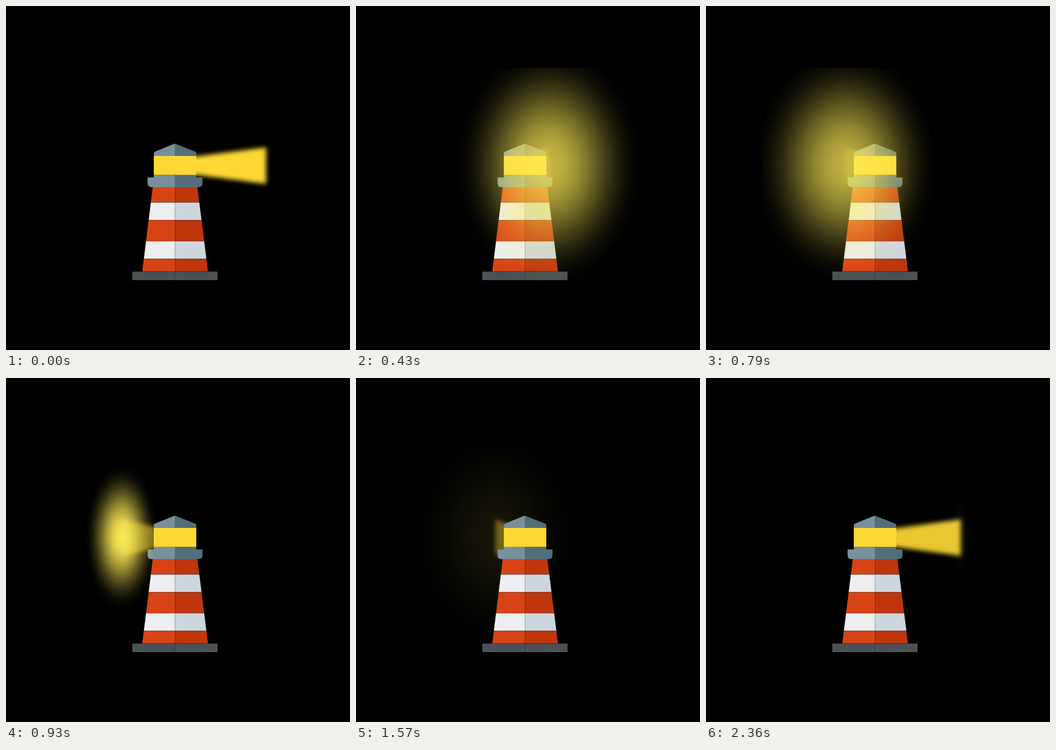
Recreate the animation shown at these times as an HTML page. Size 640x640 px, loop 2.43 s.

```html
<!DOCTYPE html>
<html lang="en">
<head>
<meta charset="utf-8">
<title>Lighthouse</title>
<style>
html, body { margin: 0; width: 100%; height: 100%; overflow: hidden; background: #000; }
svg { display: block; width: 100%; height: 100%; }
</style>
</head>
<body>
<svg viewBox="0 0 640 640">
  <defs>
    <radialGradient id="halo"></radialGradient>
    <filter id="soft" filterUnits="userSpaceOnUse" x="100" y="220" width="440" height="160" color-interpolation-filters="sRGB">
      <feGaussianBlur stdDeviation="4"/>
    </filter>
    <clipPath id="room"><rect x="104" y="115" width="422" height="410"/></clipPath>
  </defs>
  <rect width="640" height="640"/>
  <g id="glow" clip-path="url(#room)"><ellipse cy="296" fill="url(#halo)"/></g>
  <polygon id="beam" fill="#fdd835" filter="url(#soft)"/>
  <g id="house">
    <path fill="#78909c" d="M314 256 L277 271 Q275 272 275 274 V279 H314Z"/>
    <path fill="#546e7a" d="M314 256 L352 271 Q354 272 354 274 V279 H314Z"/>
    <rect x="275" y="279" width="79" height="35.5" fill="#fdd835"/>
    <path fill="#78909c" d="M275 314.5 H314 V337 H270 Q263.5 337 263.5 330 V319 H275Z"/>
    <path fill="#546e7a" d="M354 314.5 H314 V337 H358.500 Q365.500 337 365.500 330 V319 H354Z"/>
    <g id="bands"></g>
    <rect x="235" y="494" width="158.500" height="16" fill="#4b5154"/>
    <path id="seams" stroke="#000" stroke-opacity=".4" stroke-width=".7" fill="none"/>
  </g>
</svg>
<script>
const $ = id => document.getElementById(id);
const NS = 'http://www.w3.org/2000/svg';
const svg = document.querySelector('svg');
const glow = $('glow'), beam = $('beam'), house = $('house');
const halo = glow.firstElementChild;

function add(parent, tag, attrs) {
  const el = document.createElementNS(NS, tag);
  set(el, attrs);
  parent.appendChild(el);
}
function set(el, attrs) {
  for (const k in attrs) el.setAttribute(k, attrs[k]);
}

// Smooth falloff from the centre of the glow
for (let i = 0; i <= 16; i++) {
  add($('halo'), 'stop', {
    offset: i / 16,
    'stop-color': '#ffeb55',
    'stop-opacity': Math.cos(i / 16 * Math.PI / 2) ** 2
  });
}

// Tapered tower in striped halves
const MID = 314;
const levels = [337, 365.5, 398.5, 437.5, 470.5, 494];
const left = y => 273 - (y - 337) * 0.124;
const right = y => 356 + (y - 337) * 0.126;
let seams = `M${MID + 0.4} 337V510M235 494H393`;
levels.slice(1).forEach((b, i) => {
  const a = levels[i];
  const half = (side, fill) => add($('bands'), 'path', {
    d: `M${MID} ${a}H${side(a)}L${side(b)} ${b}H${MID}Z`, fill
  });
  half(left, i % 2 ? '#eceef0' : '#d84315');
  half(right, i % 2 ? '#ced6dd' : '#bf360c');
  seams += `M${left(b)} ${b}H${right(b)}`;
});
$('seams').setAttribute('d', seams);

// step, light x, glow rx, glow ry, glow opacity, beam opacity
const STEPS = 34, LOOP = 2430;
const keys = [
  [0, 484, 5, 60, 0, 1],
  [2, 439, 52, 115, 0.65, 0.75],
  [4, 395, 108, 175, 0.95, 0.5],
  [9, 304, 280, 310, 0.5, 0],
  [13, 215, 70, 138, 0.98, 0.5],
  [16, 159, 53, 120, 0.2, 0.82],
  [17, 155, 50, 118, 0.1, 0.9],
  [18, 181, 55, 122, 0.08, 0.81],
  [26, 338, 255, 285, 0.1, 0],
  [27, 357, 240, 270, 0.1, 0.12],
  [32, 463, 45, 105, 0.06, 0.8],
  [33, 474, 22, 88, 0.05, 0.92],
  [34, 484, 5, 60, 0, 1]
];

function pose(n) {
  const i = keys.findIndex(k => k[0] > n);
  const a = keys[i - 1], b = keys[i];
  const p = (n - a[0]) / (b[0] - a[0]);
  return a.map((v, j) => v + (b[j] - v) * p);
}

function draw(ms) {
  const t = ms % LOOP;
  const n = Math.floor((t + 5) * 14 / 1000) % STEPS;
  const [, x, rx, ry, glowAlpha, beamAlpha] = pose(n);
  set(halo, { cx: x, rx, ry, opacity: glowAlpha });
  set(beam, {
    points: `${MID},285 ${x},263 ${x},331 ${MID},309`,
    opacity: beamAlpha
  });
  // The light passes in front on the way left and behind on the way back
  svg.insertBefore(glow, n < 17 ? null : beam);
}

const start = performance.now();
function tick() {
  draw(performance.now() - start);
  requestAnimationFrame(tick);
}
draw(0);
requestAnimationFrame(tick);
</script>
</body>
</html>
```
